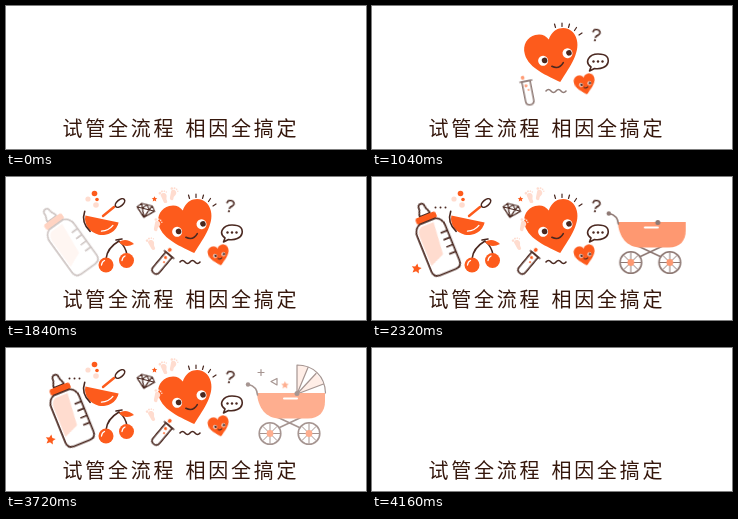
Recreate the animation shown at these times as an HTML page. Size 360 px wide and 143 px high, loop 4800 ms.

```html
<!DOCTYPE html>
<html lang="zh">
<head>
<meta charset="utf-8">
<title>试管全流程</title>
<style>
html, body { margin: 0; width: 100%; height: 100%; overflow: hidden; background: #fff; }
svg { display: block; width: 100vw; height: 100vh; }
text { font: 500 20px "Noto Sans CJK SC", "Noto Sans CJK", sans-serif; fill: #35170c; letter-spacing: 2.75px; }

.line { fill: none; stroke: #4a2820; stroke-width: 1.6; stroke-linecap: round; stroke-linejoin: round; }
.thin { stroke-width: 1.2; }
.paper { fill: #fff; }
.ink { fill: #4a2820; }
.red { fill: #fd5b1c; }
.pink { fill: #ffdccf; }
.shine { stroke: #fff; stroke-width: 1.3; }

/* One 4.8 s loop: parts enter one by one, groups leave one by one */
.in, .out { animation: 4800ms linear infinite; }
.in { --from: none; }
@keyframes heart    { 0% { opacity: 0; transform: var(--from) } 11.7%, 100% { opacity: 1; transform: none } }
@keyframes ask      { 0%, 12.1% { opacity: 0; transform: var(--from) } 15.8%, 100% { opacity: 1; transform: none } }
@keyframes bubble   { 0%, 14.2% { opacity: 0; transform: var(--from) } 17.9%, 100% { opacity: 1; transform: none } }
@keyframes baby     { 0%, 16.3% { opacity: 0; transform: var(--from) } 20%, 100% { opacity: 1; transform: none } }
@keyframes tube     { 0%, 19.2% { opacity: 0; transform: var(--from) } 23.3%, 100% { opacity: 1; transform: none } }
@keyframes feet     { 0%, 23.7% { opacity: 0; transform: var(--from) } 27.5%, 100% { opacity: 1; transform: none } }
@keyframes gem      { 0%, 26.7% { opacity: 0; transform: var(--from) } 30%, 100% { opacity: 1; transform: none } }
@keyframes bowl     { 0%, 29.2% { opacity: 0; transform: var(--from) } 33.3%, 100% { opacity: 1; transform: none } }
@keyframes dots     { 0%, 31.7% { opacity: 0; transform: var(--from) } 35%, 100% { opacity: 1; transform: none } }
@keyframes cherries { 0%, 35.4% { opacity: 0; transform: var(--from) } 38.2%, 100% { opacity: 1; transform: none } }
@keyframes bottle   { 0%, 37% { opacity: 0; transform: var(--from) } 42%, 100% { opacity: 1; transform: none } }
@keyframes bits     { 0%, 42% { opacity: 0; transform: var(--from) } 45%, 100% { opacity: 1; transform: none } }
@keyframes pram     { 0%, 45.6% { opacity: 0; transform: var(--from) } 50%, 100% { opacity: 1; transform: none } }
@keyframes canopy   { 0%, 50.8% { opacity: 0; transform: var(--from) } 57.5%, 100% { opacity: 1; transform: none } }
@keyframes plus     { 0%, 58.7% { opacity: 0 } 60.8%, 100% { opacity: 1 } }
@keyframes triangle { 0%, 60.4% { opacity: 0 } 62.5%, 100% { opacity: 1 } }
@keyframes star     { 0%, 62.1% { opacity: 0 } 64.1%, 100% { opacity: 1 } }
@keyframes pramOut  { 0%, 75.8% { opacity: 1 } 79.2%, 100% { opacity: 0 } }
@keyframes heartOut { 0%, 79.2% { opacity: 1 } 82.9%, 100% { opacity: 0 } }
@keyframes foodOut  { 0%, 82.7% { opacity: 1 } 86.5%, 100% { opacity: 0 } }
</style>
</head>
<body>
<svg viewBox="0 0 360 143">
  <defs>
    <path id="heartShape" d="M0 26C-10 17-27 5-27-10C-27-20-20-26-12-26C-6-26-2-23 0-18C3-23 8-26 13-26C21-26 27-20 27-11C27 4 10 16 0 26Z"/>
    <path id="starShape" d="M0-5L1.6-1.7L5-1.4L2.4 1L3.2 4.5L0 2.7L-3.2 4.5L-2.4 1L-5-1.4L-1.6-1.7Z"/>
    <g id="foot" class="pink">
      <path d="M-2.5-2C-3-5 3-5 3-1C3 1 1 2 1.6 4.5C2 7-1.8 7-2 4.5Z"/>
      <circle cx="-2.6" cy="-5" r="1.3"/><circle cx="0" cy="-6" r="1"/>
      <circle cx="2.3" cy="-5.4" r=".8"/><circle cx="3.9" cy="-3.9" r=".7"/>
    </g>
    <g id="wheel">
      <circle r="10.8" class="line paper"/>
      <path class="line" style="stroke-width:1" d="M-10 0H10M0-10V10M-7-7L7 7M-7 7L7-7"/>
      <circle r="3.4" class="red"/>
    </g>
  </defs>

  <g class="out" style="animation-name:foodOut">
    <g class="in" style="animation-name:bowl">
      <g transform="translate(96 42) rotate(12)">
        <path class="red" d="M-17 0H17A17 16 0 0 1-17 0Z"/>
        <path class="line" d="M-18.5-4Q-20 8-9 14.500"/>
        <path class="line shine" d="M2 12Q9 10 12 4"/>
      </g>
      <path class="line" style="stroke:#fd5b1c;stroke-width:2.4" d="M97 39L108 30"/>
      <ellipse class="line paper" cx="114" cy="26" rx="3" ry="5.6" transform="rotate(50 114 26)"/>
    </g>
    <g class="in" style="animation-name:dots">
      <circle class="red" cx="88.500" cy="16.500" r="2.800"/>
      <circle class="pink" cx="82" cy="22" r="2.600"/>
      <circle class="red" cx="91" cy="22.500" r="1.800"/>
      <circle class="pink" cx="90" cy="28" r="2.800"/>
    </g>
    <g class="in" style="animation-name:cherries">
      <path class="line" d="M100 82Q101 71 113 64Q120 70 121 78M110 63L116 62"/>
      <path class="red" d="M113 65Q120 60 128 67Q119 72 113 65Z"/>
      <circle class="red" cx="100" cy="88" r="7.500"/>
      <circle class="red" cx="120.500" cy="83.500" r="7.500"/>
      <path class="line shine" d="M95.500 88Q96 84.500 98.500 83.500M116 83.500Q116.500 80 119 79"/>
    </g>
    <g class="in" style="animation-name:bottle;--from:rotate(-19deg);transform-origin:66px 68px">
      <g transform="translate(65 68) rotate(-22) scale(1.08)">
        <path class="line paper" d="M-5-30C-5-34-3-34-3-37Q-3-41 0-41T3-37C3-34 5-34 5-30Z"/>
        <rect class="red" x="-10" y="-30" width="20" height="6.500" rx="2"/>
        <path class="line paper" d="M-8-23.500H8Q14-21 14-14V21Q14 27 8 27H-8Q-14 27-14 21V-14Q-14-21-8-23.500Z"/>
        <path class="pink" d="M-12-13Q-12-19-7-21H5L2 10L-12 16Z"/>
        <path class="line" d="M8-9H13.500M8-2H13.500M8 5H13.500M8 12H13.500"/>
      </g>
    </g>
    <g class="in" style="animation-name:bits">
      <use href="#starShape" class="red" transform="translate(44.500 91.500) rotate(10)"/>
      <g class="ink"><circle cx="63.500" cy="30.500" r="1"/><circle cx="68.500" cy="30.500" r="1"/><circle cx="73.500" cy="30.500" r="1"/></g>
    </g>
  </g>

  <g class="out" style="animation-name:heartOut">
    <g class="in" style="animation-name:heart;--from:translate(17px,24px)">
      <path class="line thin" d="M182.500 18L183.500 21.500M190 17V20.500M197.500 18L196.500 21.500M204.500 21.500L202.500 24.500M210 27L207 29"/>
      <g transform="translate(181.500 51) rotate(-15)">
        <use href="#heartShape" class="red"/>
        <circle class="paper" cx="-11" cy="1" r="5"/><circle class="paper" cx="14.500" cy="0" r="5"/>
        <circle class="ink" cx="-9.500" cy="1" r="2.800"/><circle class="ink" cx="16" cy="0" r="2.800"/>
        <path class="line" d="M-4 8.500Q2 14 8 8"/>
      </g>
    </g>
    <g class="in" style="animation-name:ask">
      <g transform="translate(224 29) rotate(12)">
        <path class="line" d="M-3.500-2.500Q-3.500-5.500 0-5.500T3.500-2.500C3.500 0 0 0 0 2.500"/>
        <circle class="ink" cy="5.300" r="1.100"/>
      </g>
    </g>
    <g class="in" style="animation-name:bubble">
      <path class="line paper" d="M219 61C212 56 217 48 226 48S237 52 236 56.500S229 63.500 222.500 62.500L217.500 65Z"/>
      <g class="ink"><circle cx="221.500" cy="55.500" r="1.200"/><circle cx="226" cy="55.500" r="1.200"/><circle cx="230.500" cy="55.500" r="1.200"/></g>
    </g>
    <g class="in" style="animation-name:baby">
      <g transform="translate(213 78.500) rotate(-12) scale(.39)">
        <use href="#heartShape" class="red"/>
        <circle class="paper" cx="-10" cy="-1" r="5"/><circle class="paper" cx="12" cy="-1" r="5"/>
        <circle class="ink" cx="-9" cy="-1" r="3.300"/><circle class="ink" cx="13" cy="-1" r="3.300"/>
        <path class="line" style="stroke-width:2.600" d="M-4 7Q1 12 6 7"/>
      </g>
    </g>
    <g class="in" style="animation-name:tube;--from:rotate(-130deg);transform-origin:156px 86px">
      <g transform="translate(156 86) rotate(40)">
        <path class="line paper" d="M-4.200-11V8.500Q-4.200 13 0 13T4.200 8.500V-11Z"/>
        <path class="line" d="M-6-11H6"/>
        <circle class="red" cx="-.8" cy="-6.500" r="1.500"/><circle class="red" cx="1" cy="-2" r="1"/>
        <circle class="red" cx="-2.500" cy="-15" r="1.900"/>
      </g>
    </g>
    <path class="in line" style="animation-name:tube" d="M174 85Q176.500 82 179 85T184 85T189 85T194 85"/>
    <g class="in" style="animation-name:feet">
      <use href="#foot" transform="translate(158 20) rotate(-20)"/>
      <use href="#foot" transform="translate(167 17) rotate(15)"/>
      <use href="#foot" transform="translate(151 48) rotate(15)"/>
      <use href="#foot" transform="translate(145.500 67) rotate(-25)"/>
      <use href="#starShape" class="red" transform="translate(148.500 22) scale(.55)"/>
    </g>
    <g class="in" style="animation-name:gem">
      <path class="line thin" transform="translate(139.500 33.500) rotate(14)" d="M-5.500-6H5.500L9-1.500L0 7L-9-1.500ZM-9-1.500H9M-5.500-6L-3.500-1.500L0-6L3.500-1.500L5.500-6M-3.500-1.500L0 7L3.500-1.500"/>
    </g>
  </g>

  <g class="out" style="animation-name:pramOut">
    <g class="in" style="animation-name:canopy;--from:rotate(-35deg);transform-origin:291px 46px">
      <path class="paper" d="M291 46V17C307 17 319 28 319.500 45Z"/>
      <path class="pink" d="M291 46V17Q297 17 302 19.500ZM291 46L310 25.500Q315 30 317.500 36Z"/>
      <path class="line thin" d="M291 46V17C307 17 319 28 319.500 45M291 46L302 19.500M291 46L310 25.500M291 46L317.500 36"/>
    </g>
    <g class="in" style="animation-name:pram;--from:translate(-14px,0)">
      <path class="line" d="M264 84L296 69M303 84L271 69"/>
      <use href="#wheel" x="264" y="85.500"/><use href="#wheel" x="303" y="85.500"/>
      <path class="red" d="M251 45H319V53C319 64 313 70.500 302 70.500H274C260 70.500 252 60 251 45Z"/>
      <path class="line" d="M251.500 47Q251 38.500 242.500 36.500"/>
      <circle class="ink" cx="242" cy="36.500" r="2.200"/>
      <circle class="ink" cx="291" cy="45.500" r="2.500"/>
      <path class="line shine" style="stroke-width:2" d="M278 50.500H291"/>
    </g>
    <path class="in line thin" style="animation-name:plus" d="M255 21.500V27.500M252 24.500H258"/>
    <path class="in line thin" style="animation-name:triangle" d="M265 33.500L271 30.500V37Z"/>
    <g class="in" style="animation-name:star">
      <use href="#starShape" class="red" transform="translate(279 37) scale(.75)"/>
    </g>
  </g>

  <text y="129.500"><tspan x="56.500">试管全流程</tspan><tspan x="179.500">相因全搞定</tspan></text>
</svg>
</body>
</html>
```
